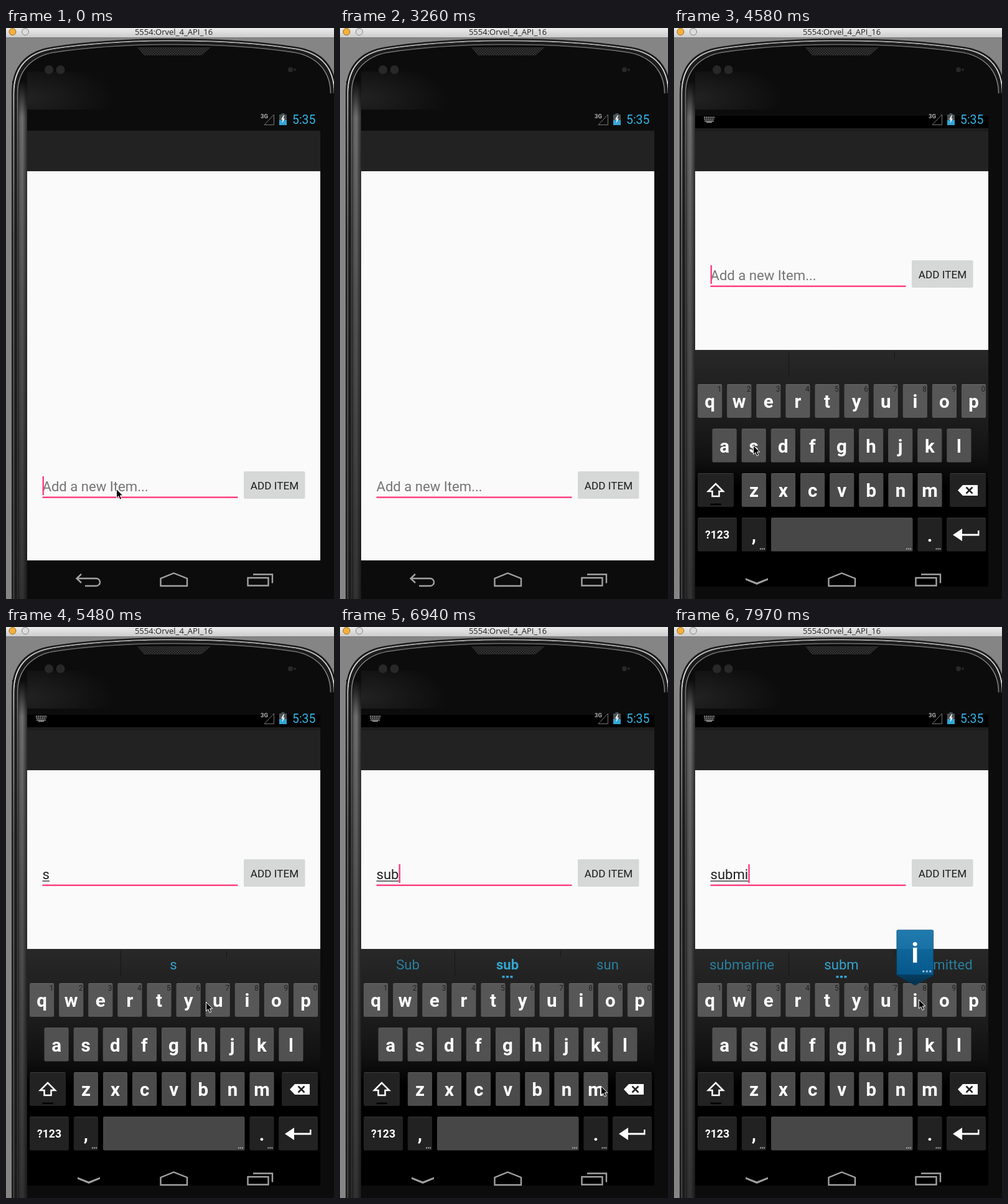
These frames come from a looping animation (527 px wide and 917 px high, 8000 ms). An HTML page:

```html
<!DOCTYPE html>
<html lang="en">
<head>
<meta charset="utf-8">
<title>Add item</title>
<style>
html, body { margin: 0; width: 100%; height: 100%; overflow: hidden; background: #0c0c0c; }
svg { display: block; width: 527px; height: 917px; font-family: Roboto, sans-serif; }
.mid { text-anchor: middle; }
.key { font-weight: 700; font-size: 29.5px; fill: #fff; text-anchor: middle; }
.hint { font-size: 12px; fill: #222; text-anchor: middle; }
.field { font-size: 22.1px; }
.icon { fill: none; stroke: #a2a2a2; stroke-width: 2.4; }
</style>
</head>
<body>
<svg viewBox="0 0 527 917">
  <defs>
    <linearGradient id="bar" x2="0" y2="1"><stop stop-color="#ececec"/><stop offset="1" stop-color="#cacaca"/></linearGradient>
    <linearGradient id="side">
      <stop stop-color="#1a1a1a"/><stop offset=".2" stop-color="#333"/>
      <stop offset=".36" stop-color="#1c1c1c"/><stop offset=".5" stop-color="#606060"/><stop offset=".68" stop-color="#707070"/>
      <stop offset="1" stop-color="#2b2b2b"/>
    </linearGradient>
    <linearGradient id="shade" x2="0" y2="1">
      <stop stop-color="#0c0c0c"/><stop offset=".07" stop-color="#0c0c0c" stop-opacity="0"/>
      <stop offset=".4" stop-color="#0c0c0c" stop-opacity=".25"/><stop offset="1" stop-color="#0c0c0c" stop-opacity=".6"/>
    </linearGradient>
    <linearGradient id="metal" gradientUnits="userSpaceOnUse" x1="0" y1="18" x2="0" y2="917">
      <stop stop-color="#a8a8a8"/><stop offset=".07" stop-color="#dedede"/><stop offset=".15" stop-color="#a0a0a0"/>
      <stop offset=".35" stop-color="#666"/><stop offset="1" stop-color="#484848"/>
    </linearGradient>
    <radialGradient id="sheen" cx="0" cy=".7" r="1"><stop stop-color="#222"/><stop offset="1" stop-color="#0c0c0c"/></radialGradient>
    <linearGradient id="board" x2="0" y2="1">
      <stop stop-color="#282828"/><stop offset=".12" stop-color="#222"/><stop offset=".3" stop-color="#1c1c1c"/>
      <stop offset=".46" stop-color="#111"/><stop offset=".58" stop-color="#000"/>
    </linearGradient>
    <linearGradient id="pop" x2="0" y2="1"><stop stop-color="#1474aa"/><stop offset=".8" stop-color="#045a90"/><stop offset=".81" stop-color="#043f64"/><stop offset="1" stop-color="#04304e"/></linearGradient>
    <pattern id="mesh" width="4" height="4" patternUnits="userSpaceOnUse"><rect width="4" height="4" fill="#1b1b1b"/><path d="M0 0h2v2h-2zM2 2h2v2h-2z" fill="#333"/></pattern>
  </defs>

  <rect width="527" height="917" fill="#858585"/>
  <g id="shell"></g>
  <rect x="34" y="70" width="140" height="61" fill="url(#sheen)"/>
  <path d="M211 31H329L314 44H222Z" fill="url(#mesh)"/>
  <g fill="#282828"><circle cx="69" cy="67" r="7"/><circle cx="87.500" cy="67" r="7"/><circle cx="457" cy="67" r="4"/><circle cx="464" cy="67" r="2"/></g>

  <rect width="527" height="16" fill="url(#bar)"/>
  <path d="M0 15.500H527" stroke="#777"/>
  <circle cx="10.500" cy="6" r="5.500" fill="#f3b13c" stroke="#9b6a1d"/>
  <circle cx="31" cy="6" r="5.500" fill="#dcdcdc" stroke="#858585"/>
  <text x="269.500" y="10.500" class="mid" style="font:13px 'Open Sans',sans-serif" fill="#222">5554:Orvel_4_API_16</text>

  <rect x="34" y="165" width="471" height="65" fill="#222"/>
  <g id="topDark">
    <rect x="34" y="141" width="471" height="20" fill="#000"/>
    <rect x="34" y="161" width="471" height="5" fill="#1d1d1d"/>
    <path d="M48 143.500H65M48.500 146.500H64.500" stroke="#a0a0a0" stroke-width="2" stroke-dasharray="2 1"/>
    <path d="M49 149.500H64M52 151.500H61" stroke="#a0a0a0" stroke-width="1.500"/>
  </g>
  <text x="409" y="145" font-size="9.500" font-weight="700" fill="#b4b4b4">3G</text>
  <path d="M415 155.500H430.500V139Z" fill="none" stroke="#777"/>
  <path d="M442.500 137h5v2h3.500v17h-12v-17h3.500z" fill="#4a5357"/>
  <path d="M439 148h12v8h-12z" fill="#33a5d4"/>
  <path d="M446 140l-4 7h2.500l-1 6 4.500-7.500h-2.500l1.500-5.500z" fill="#fff"/>
  <text x="460" y="154" font-size="19.400" fill="#33b5e5">5:35</text>

  <rect id="page" x="34" y="230" width="471" fill="#fafafa"/>
  <g id="form">
    <rect x="382" y="712" width="98.500" height="44" rx="2" fill="#d6d7d7"/>
    <text x="431.500" y="741" class="mid" font-size="17.170" fill="#1c1c1c">ADD ITEM</text>
    <rect x="58.500" y="752.500" width="314" height="2.500" fill="#ff4081"/>
    <text id="prompt" class="field" x="58.500" y="744" fill="#757575">Add a new Item...</text>
    <text id="typed" class="field" x="58.500" y="744" fill="#212121"></text>
    <rect id="under" x="58.500" y="746.300" height="1.400" fill="#333"/>
    <rect id="caret" y="720" width="2.500" height="30" fill="#ff4081"/>
  </g>

  <g id="keyboard">
    <rect x="34" y="517" width="471" height="380" fill="url(#board)"/>
    <path d="M184.500 520V560M354.500 520V530" stroke="#161616"/>
    <g id="words" class="mid" font-size="22.080">
      <text x="109" y="550" fill="#2a7f9f"></text>
      <text x="269" y="550" fill="#33a5d0"></text>
      <text x="430" y="550" fill="#2a7f9f"></text>
    </g>
    <path id="more" d="M260.500 560h4v3.500h-4zM267 560h4v3.500h-4zM273.500 560h4v3.500h-4z" fill="#33a5d0"/>
    <g id="keys"></g>
    <path d="M67 732l12 12h-6.500v8h-11v-8h-6.500z" fill="none" stroke="#fff" stroke-width="2.500"/>
    <path d="M58.500 765H76" stroke="#000" stroke-width="2.500"/>
    <path d="M456 742.500l8-8.500h24v17h-24z" fill="#fff"/>
    <path d="M469.500 737.500l10 10m0-10l-10 10" stroke="#222" stroke-width="2.500"/>
    <path d="M448 814l15-10v8.500h25V807h2.500v8.500h-27.500v8.500z" fill="#fff"/>
  </g>

  <path id="back" class="icon" d="M121 877l-7.500 7 7.500 7M114 884H145a6 6 0 0 1 0 12H127"/>
  <path id="down" d="M115 883.500l18 7 18-7v3l-18 7.500-18-7.500z" fill="#a2a2a2"/>
  <path class="icon" d="M248.500 896V884L269.500 875.500 291 884V896Z"/>
  <path class="icon" d="M388.500 883H421.500V895.500H388.500ZM397 877.500H428V891.500"/>

  <g id="popup">
    <path d="M-29.500 2a2 2 0 0 1 2-2h55a2 2 0 0 1 2 2V73L0 89L-29.500 73Z" fill="url(#pop)" fill-opacity=".95" stroke="#033a5c" stroke-opacity=".5"/>
    <text class="mid" y="52" font-size="45" font-weight="700" fill="#fff"></text>
    <path d="M12 65h3v3h-3zM17.500 65h3v3h-3zM23 65h3v3h-3z" fill="#9cc6de"/>
  </g>
  <path id="mouse" d="M0 0V14.300L3.300 11.300 5.600 16.700 8.200 15.600 5.900 10.400H10.400Z" fill="#000" stroke="#fff"/>
</svg>
<script>
const $ = id => document.getElementById(id);
const show = (node, on) => { node.style.display = on ? '' : 'none'; };

// Phone outline, inset by d
const outline = d => `M${10 + d} 917V105C${10 + d} ${58 + d} ${35 + d} ${37 + d} 75 ${31 + d}
  C140 ${21 + d} 210 ${18 + d} 270 ${18 + d}S400 ${21 + d} 465 ${31 + d}
  C${505 - d} ${37 + d} ${530 - d} ${58 + d} ${530 - d} 105`;
const rim = (d, color, w, alpha = 1) =>
  `<path d="${outline(d)}" fill="none" stroke="${color}" stroke-width="${w}" stroke-opacity="${alpha}"/>`;
$('shell').innerHTML = `<path d="${outline(0)}V917Z" fill="#0c0c0c"/>
  <rect x="10" y="85" width="24" height="832" fill="url(#side)"/>
  <rect x="10" y="85" width="24" height="832" fill="url(#shade)"/>`
  + rim(0, '#1c1c1c', 2) + rim(2.5, 'url(#metal)', 2) + rim(5.5, '#1c1c1c', 4) + rim(8.5, 'url(#metal)', 1.5, .6);

// Keyboard
const PITCH = 47.1, centers = {};
const cap = (x, y, w, fill) =>
  `<rect x="${x}" y="${y}" width="${w}" height="54" rx="2" fill="${fill}"/>
   <path d="M${x + 1} ${y + .5}h${w - 2}" stroke="#fff" stroke-opacity=".13"/>`;
const label = (x, y, s, cls = 'key', size = '') =>
  `<text class="${cls}" x="${x}" y="${y}" ${size && `style="font-size:${size}px"`}>${s}</text>`;
const dots = x => `<path d="M${x} 835.500h2v2h-2zM${x + 3} 835.500h2v2h-2zM${x + 6} 835.500h2v2h-2z" fill="#aaa"/>`;
const rows = [['qwertyuiop', 38, 572, '#575757'], ['asdfghjkl', 61.5, 643.5, '#515151'], ['zxcvbnm', 108.8, 715, '#4b4b4b']];
let keys = '';
for (const [letters, x0, y, fill] of rows) {
  [...letters].forEach((c, i) => {
    const x = x0 + i * PITCH;
    centers[c] = [x + 19.6, y];
    keys += cap(x, y, 39.2, fill) + label(x + 19.6, y + 38, c);
    if (y === 572) keys += label(x + 35, y + 12, (i + 1) % 10, 'hint');
  });
}
const DARK = '#222';
keys += cap(38, 715, 58, DARK) + cap(443, 715, 58, DARK)
  + cap(38, 786.5, 63, DARK) + label(69.5, 820, '?123', 'key', 17.6)
  + cap(108.8, 786.5, 39.2, DARK) + label(128.4, 824.5, ',') + dots(138)
  + cap(156, 786.5, 227.5, '#474747') + dots(373)
  + cap(391.4, 786.5, 39.2, DARK) + label(411, 824.5, '.') + dots(420.5)
  + cap(438, 786.5, 63, DARK);
$('keys').innerHTML = keys;

// Each step lists only what changes
const LOOP = 8000;
const steps = [
  [0, { kb: false, caret: true, mouse: [177.5, 740.5], text: '', words: [], pop: '' }],
  [290, { caret: false }],
  [740, { caret: true }],
  [890, { mouse: [176, 755.5] }],
  [1040, { mouse: null }],
  [1330, { caret: false }],
  [1780, { caret: true }],
  [2370, { caret: false }],
  [2820, { caret: true }],
  [3260, { caret: false }],
  [3380, { kb: true, caret: true, mouse: [268.5, 604.5] }],
  [3680, { mouse: [264, 607] }],
  [3830, { mouse: [240, 617], caret: false }],
  [3980, { mouse: [205, 633] }],
  [4130, { mouse: [170, 650] }],
  [4280, { mouse: [145, 662], caret: true }],
  [4430, { mouse: [131, 669] }],
  [4580, { mouse: [127.5, 670.5] }],
  [4730, { text: 's', pop: 's' }],
  [4880, { pop: '', words: ['', 's', ''] }],
  [5180, { mouse: [180, 650], caret: false }],
  [5330, { mouse: [268, 618] }],
  [5480, { mouse: [321.5, 602.5] }],
  [5630, { mouse: [335, 601], caret: true }],
  [5780, { text: 'su', pop: 'u' }],
  [5930, { pop: '', words: ['sun', 'su', 'summer'] }],
  [6080, { mouse: [331, 650] }],
  [6210, { mouse: [320, 729] }],
  [6360, { mouse: [317, 739] }],
  [6510, { text: 'sub', pop: 'b' }],
  [6660, { pop: '', words: ['Sub', 'sub', 'sun'], bold: true }],
  [6800, { mouse: [375, 739] }],
  [6940, { mouse: [419.5, 737.5] }],
  [7240, { text: 'subm', pop: 'm' }],
  [7390, { pop: '', words: ['submarine', 'subm', 'submitted'], bold: false }],
  [7540, { mouse: [416, 705] }],
  [7690, { mouse: [404, 635] }],
  [7840, { mouse: [393.5, 598.5], caret: false }],
  [7970, { text: 'submi', pop: 'i', caret: true }]
];
let state = {};
const states = steps.map(([, change]) => (state = { ...state, ...change }));

const move = (node, x, y) => node.setAttribute('transform', `translate(${x} ${y})`);

function draw(s) {
  for (const id of ['keyboard', 'topDark', 'down']) show($(id), s.kb);
  show($('back'), !s.kb);
  $('page').setAttribute('height', s.kb ? 287 : 625);
  move($('form'), 0, s.kb ? -339 : 0);

  show($('prompt'), !s.text);
  $('typed').textContent = s.text;
  const w = s.text ? $('typed').getComputedTextLength() : 0;
  $('under').setAttribute('width', w);
  $('caret').setAttribute('x', 58.5 + w);
  show($('caret'), s.caret);

  [...$('words').children].forEach((t, i) => { t.textContent = s.words[i] || ''; });
  $('words').children[1].setAttribute('font-weight', s.bold ? 700 : 400);
  show($('more'), !!s.words[0]);

  show($('popup'), s.pop);
  if (s.pop) {
    const [x, y] = centers[s.pop];
    move($('popup'), x, y - 85.5);
    $('popup').children[1].textContent = s.pop;
  }
  show($('mouse'), s.mouse);
  if (s.mouse) move($('mouse'), ...s.mouse);
}

let last = -1;
function tick() {
  const t = performance.now() % LOOP;
  let i = steps.length - 1;
  while (steps[i][0] > t) i--;
  if (i !== last) draw(states[last = i]);
  requestAnimationFrame(tick);
}
tick();
</script>
</body>
</html>
```
